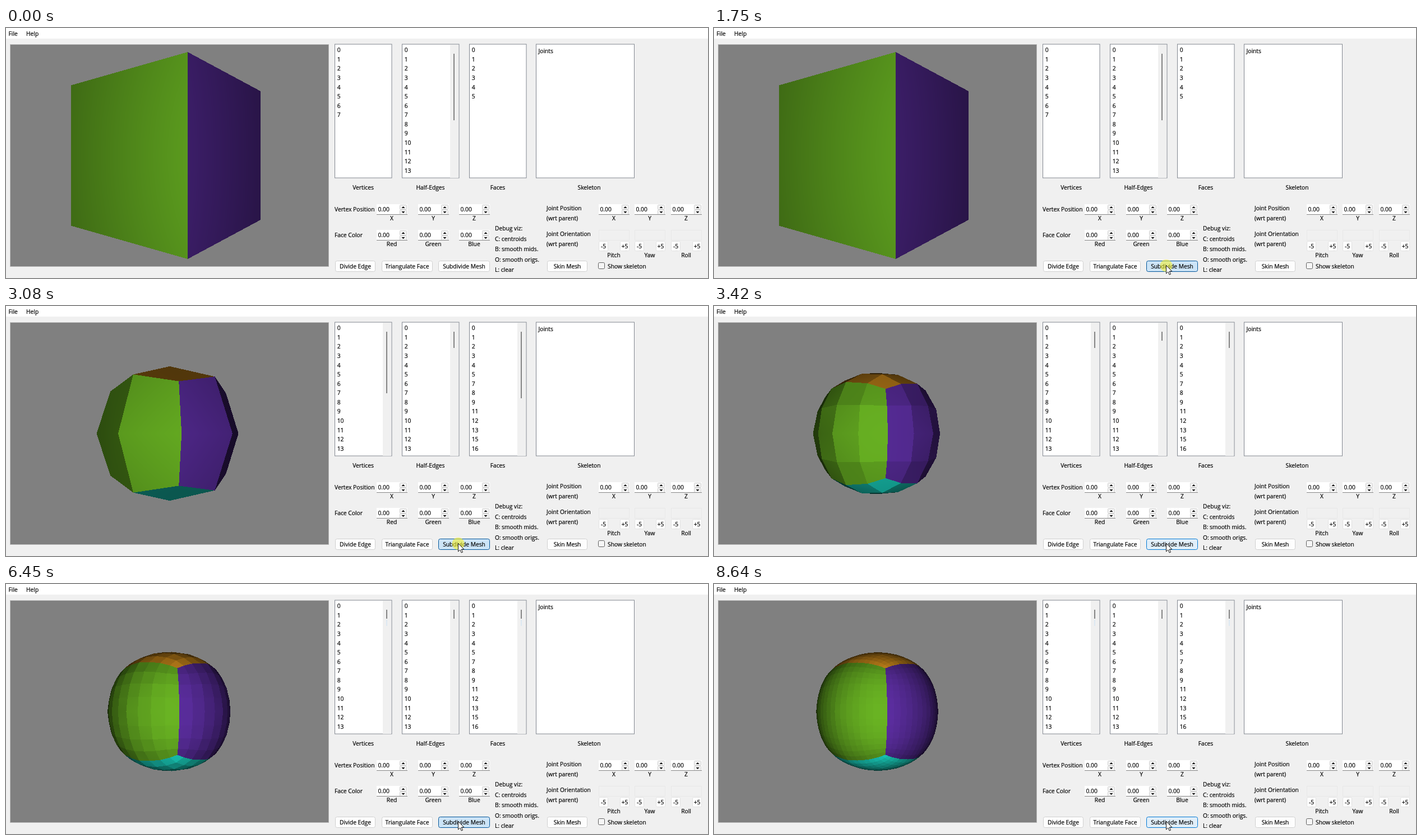
An HTML page with a canvas for the animation above (8710 ms loop, 1252 by 447 pixels).

```html
<!DOCTYPE html>
<html lang="en">
<head>
<meta charset="utf-8">
<title>Mesh subdivision</title>
<style>
html, body { margin: 0; width: 100%; height: 100%; overflow: hidden; background: #f0f0f0; }
canvas { position: absolute; left: 7px; top: 29px; }
svg { position: absolute; left: 0; top: 0; }
text { font: 10.25px "Open Sans", "Noto Sans", sans-serif; fill: #000; stroke: #000; stroke-width: .2px; }
</style>
</head>
<body>
<canvas id="view" width="569" height="398"></canvas>
<svg id="ui" width="1252" height="447" viewBox="0 0 1252 447"></svg>
<script>
const LOOP = 8710;
// press, highlight end, release
const CLICKS = [[1560, 1820, 1820], [2940, 3180, 3180], [4500, 4700, 4900], [6180, 6450, 8510]];
const $ = id => document.getElementById(id);
const clamp = v => Math.max(0, Math.min(1, v));

// ---- vectors ----
const sub = (a, b) => a.map((v, i) => v - b[i]);
const dot = (a, b) => a[0] * b[0] + a[1] * b[1] + a[2] * b[2];
const mean = list => [0, 1, 2].map(i => list.reduce((s, p) => s + p[i], 0) / list.length);
const unit = a => { const l = Math.hypot(...a); return a.map(v => v / l); };
const cross = (a, b) => [
  a[1] * b[2] - a[2] * b[1], a[2] * b[0] - a[0] * b[2], a[0] * b[1] - a[1] * b[0]];

// ---- mesh, in camera space ----
const DIST = 2, TURN = 38 * Math.PI / 180;

function cube() {
  const s = Math.sin(TURN), c = Math.cos(TURN), verts = [];
  for (let i = 0; i < 8; i++) {
    const a = i & 1 ? .5 : -.5, b = i & 2 ? .5 : -.5, y = i & 4 ? .5 : -.5;
    verts.push([b * c - a * s, y, DIST - a * c - b * s]);
  }
  const green = [88, 150, 29], purple = [78, 39, 136];
  const faces = [
    [[1, 3, 7, 5], green], [[2, 3, 7, 6], purple], [[4, 5, 7, 6], [208, 140, 28]],
    [[0, 1, 3, 2], [27, 222, 202]], [[0, 2, 6, 4], purple], [[0, 1, 5, 4], green]
  ].map(([ids, color]) => ({ ids, color }));
  return { verts, faces };
}

function subdivide({ verts, faces }) {
  const out = [], edges = new Map();
  const around = verts.map(() => ({ mids: [], cents: [] }));
  const key = (a, b) => Math.min(a, b) + "_" + Math.max(a, b);
  const cents = faces.map(f => mean(f.ids.map(i => verts[i])));
  faces.forEach((f, k) => f.ids.forEach((a, i) => {
    const b = f.ids[(i + 1) % 4], id = key(a, b);
    if (!edges.has(id)) edges.set(id, { a, b, cents: [] });
    edges.get(id).cents.push(cents[k]);
    around[a].cents.push(cents[k]);
  }));
  for (const e of edges.values()) {
    const mid = mean([verts[e.a], verts[e.b], ...e.cents]);
    around[e.a].mids.push(mid);
    around[e.b].mids.push(mid);
    e.mid = mid;
  }
  verts.forEach((v, k) => {
    const { mids, cents } = around[k], n = mids.length, m = mean(mids), c = mean(cents);
    out.push(v.map((x, i) => ((n - 2) * x + m[i] + c[i]) / n));
  });
  for (const e of edges.values()) e.index = out.push(e.mid) - 1;
  const quads = [];
  faces.forEach((f, k) => {
    const c = out.push(cents[k]) - 1;
    f.ids.forEach((a, i) => {
      const next = edges.get(key(a, f.ids[(i + 1) % 4])).index;
      const prev = edges.get(key(a, f.ids[(i + 3) % 4])).index;
      quads.push({ ids: [a, next, c, prev], color: f.color });
    });
  });
  return { verts: out, faces: quads };
}

// ---- renderer with depth buffer, light at the camera ----
const W = 569, H = 398, CX = 285.1, CY = 199, FOCAL = H / 2 / Math.tan(Math.PI / 8);

function render(mesh) {
  const img = new ImageData(W, H), depth = new Float32Array(W * H);
  for (let i = 0; i < W * H; i++) img.data.set([128, 128, 128, 255], i * 4);
  const side = (a, b, x, y) => (b.x - a.x) * (y - a.y) - (b.y - a.y) * (x - a.x);

  function triangle(a, b, c, color) {
    const area = side(a, b, c.x, c.y);
    if (!area) return;
    const xs = [a.x, b.x, c.x], ys = [a.y, b.y, c.y];
    const x1 = Math.max(...xs), y1 = Math.max(...ys);
    for (let py = Math.floor(Math.min(...ys)); py <= y1; py++) {
      for (let px = Math.floor(Math.min(...xs)); px <= x1; px++) {
        const x = px + .5, y = py + .5;
        const u = side(b, c, x, y) / area, v = side(c, a, x, y) / area, w = 1 - u - v;
        if (u < 0 || v < 0 || w < -1e-9) continue;
        const q = [u / a.p[2], v / b.p[2], w / c.p[2]], inv = q[0] + q[1] + q[2], at = py * W + px;
        if (inv <= depth[at]) continue;
        depth[at] = inv;
        const blend = k => [0, 1, 2].map(i => q[0] * a[k][i] + q[1] * b[k][i] + q[2] * c[k][i]);
        const light = .2 + clamp(-dot(unit(blend("n")), unit(blend("p"))));
        for (let i = 0; i < 3; i++) img.data[at * 4 + i] = color[i] * light;
      }
    }
  }

  for (const { ids, color } of mesh.faces) {
    const quad = ids.map((id, i) => {
      const p = mesh.verts[id];
      let n = unit(cross(sub(mesh.verts[ids[(i + 1) % 4]], p), sub(mesh.verts[ids[(i + 3) % 4]], p)));
      if (dot(n, sub(p, [0, 0, DIST])) < 0) n = n.map(v => -v);
      return { p, n, x: CX + FOCAL * p[0] / p[2], y: CY - FOCAL * p[1] / p[2] };
    });
    triangle(quad[0], quad[1], quad[2], color);
    triangle(quad[0], quad[2], quad[3], color);
  }
  return img;
}

const pictures = [];
for (let i = 0, mesh = cube(); i < 5; i++) {
  pictures.push(render(mesh));
  if (i < 4) mesh = subdivide(mesh);
}

// ---- window ----
const rect = (x, y, w, h, fill, more = "") =>
  `<rect x="${x}" y="${y}" width="${w}" height="${h}" fill="${fill}" ${more}/>`;
const box = (x, y, w, h, fill, stroke, r = 0, more = "") =>
  rect(x + .5, y + .5, w - 1, h - 1, fill, `stroke="${stroke}" rx="${r}" ${more}`);
const label = (x, y, s, anchor = "start") => `<text x="${x}" y="${y}" text-anchor="${anchor}">${s}</text>`;
const centered = (x, y, s) => label(x, y, s, "middle");
const button = (x, w, s, id = "") =>
  box(x, 416, w, 20, "#fdfdfd", "#d0d0d0", 3, id && `id="${id}"`) + centered(x + w / 2, 430, s);

function spin(x, y) {
  const arrow = (top, d) => box(x + 41, top, 13, 9, "#f3f3f3", "#cfcfcf", 1) +
    `<path d="M${x + 44.5} ${top + 4.5 - d * 1.5}h6l-3 ${3 * d}z"/>`;
  return rect(x, y, 55, 19, "#fff") + arrow(y + 1, -1) + arrow(y + 10, 1) +
    rect(x, y + 18, 55, 1, "#868686") + label(x + 2.5, y + 13, "0.00");
}

function stepper(x, name) {
  const small = (bx, s) => box(bx, 381, 17, 18, "#fdfdfd", "#e2e2e2", 2) + centered(bx + 8.5, 394, s);
  return box(x, 361, 55, 19, "#f0f0f0", "#e8e8e8") + small(x, "-5") + small(x + 38, "+5") +
    centered(x + 27, 410, name);
}

const range = n => [...Array(n).keys()];
const LISTS = [
  { x: 586, name: "Vertices", bars: [0, 156, 75, 62, 62], tail: true, rows: l => range(l ? 14 : 8) },
  { x: 706, name: "Half-Edges", bars: [165, 75, 62, 62, 62], rows: () => range(14) },
  { x: 826, name: "Faces", bars: [0, 165, 75, 62, 62], tail: true,
    rows: l => l ? range(17).filter(i => i < 6 || i % 4 != 2) : range(6) }
];

function lists(level) {
  return LISTS.map(({ x, bars, tail, rows }) => {
    let s = rows(level).map((v, i) => label(x + 4.7, (43.3 + i * 16.57).toFixed(2), v)).join("");
    if (bars[level]) {
      s += rect(x + 86, 30, 15, 238, "#f0f0f0") + rect(x + 92, 46, 2, bars[level] - 46, "#858585");
      if (tail && level > 2) s += rect(x + 92, 64, 2, 11, "#dce8f2");
    }
    return s;
  }).join("");
}

const columns = (xs, names, y) => xs.map((x, i) => spin(x, y) + centered(x + 27, y + 29, names[i])).join("");
const left = [661, 735, 808], right = [1057, 1121, 1186];

$("ui").innerHTML =
  rect(0, 0, 1252, 19, "#fff") + label(4.5, 13.7, "File") + label(36, 13.7, "Help") +
  box(7, 29, 569, 398, "none", "#f0f0f0", 0, `stroke-opacity=".5"`) +
  LISTS.map(l => box(l.x, 28.5, 102.5, 240, "#fff", "#828790") + centered(l.x + 51, 289, l.name)).join("") +
  box(945, 28.5, 176, 240, "#fff", "#828790") + label(949.5, 45, "Joints") + centered(1040, 289, "Skeleton") +
  `<g id="lists"></g>` +
  label(586, 328, "Vertex Position") + columns(left, ["X", "Y", "Z"], 315) +
  label(586, 374, "Face Color") + columns(left, ["Red", "Green", "Blue"], 361) +
  ["Debug viz:", "C: centroids", "B: smooth mids.", "O: smooth origs.", "L: clear"]
    .map((s, i) => label(872, 362 + i * 18.5, s)).join("") +
  label(964, 325.5, "Joint Position") + label(964, 343.7, "(wrt parent)") + columns(right, ["X", "Y", "Z"], 315) +
  label(964, 371.5, "Joint Orientation") + label(964, 389.7, "(wrt parent)") +
  ["Pitch", "Yaw", "Roll"].map((s, i) => stepper(right[i], s)).join("") +
  button(587, 72, "Divide Edge") + button(670, 91, "Triangulate Face") +
  button(771, 92, "Subdivide Mesh", "main") + button(965, 72, "Skin Mesh") +
  box(1056, 419, 12, 12, "#f6f6f6", "#5f5f5f", 2) + label(1073, 429.5, "Show skeleton") +
  `<circle id="ring" cx="806.5" cy="425" r="11" fill="#f3f02c"/>` +
  `<path id="cursor" d="M0 0V14.5L3.4 11.4L5.7 16.6L8 15.6L5.7 10.5H10.3Z" fill="#fff" stroke="#000" stroke-width=".9"/>`;

// ---- animation ----
const mix = (a, b, k) => `rgb(${a.map((v, i) => Math.round(v + (b[i] - v) * k))})`;
const IDLE = [[253, 253, 253], [208, 208, 208]];
const HOVER = [[224, 238, 249], [0, 120, 212]];
const DOWN = [[204, 228, 247], [0, 84, 153]];
let shown = -1;

function draw(t) {
  const level = CLICKS.filter(c => t >= c[2]).length;
  if (level != shown) {
    $("view").getContext("2d").putImageData(pictures[level], 0, 0);
    $("lists").innerHTML = lists(level);
    shown = level;
  }

  const go = 1 - (1 - clamp((t - 600) / 540)) ** 2;
  $("cursor").setAttribute("visibility", t < 660 ? "hidden" : "visible");
  $("cursor").setAttribute("transform", `translate(${806.5 + 158 * (1 - go)} ${424.5 + 18 * (1 - go)})`);

  const click = CLICKS.filter(c => t >= c[0]).pop();
  let from = IDLE, to = HOVER, k = clamp((t - 900) / 200), alpha = 0;
  if (click) {
    const [press, end, release] = click;
    const held = t < release;
    [from, to] = held ? [HOVER, DOWN] : [DOWN, HOVER];
    k = held ? clamp((t - press + 40) / 120) : clamp((t - release) / 130);
    if (t < end) alpha = .75 - .25 * (t - press) / (end - press);
  }
  $("main").setAttribute("fill", mix(from[0], to[0], k));
  $("main").setAttribute("stroke", mix(from[1], to[1], k));
  $("ring").setAttribute("opacity", alpha);
}

const start = performance.now();
function tick() {
  draw((performance.now() - start) % LOOP);
  requestAnimationFrame(tick);
}
tick();
</script>
</body>
</html>
```
